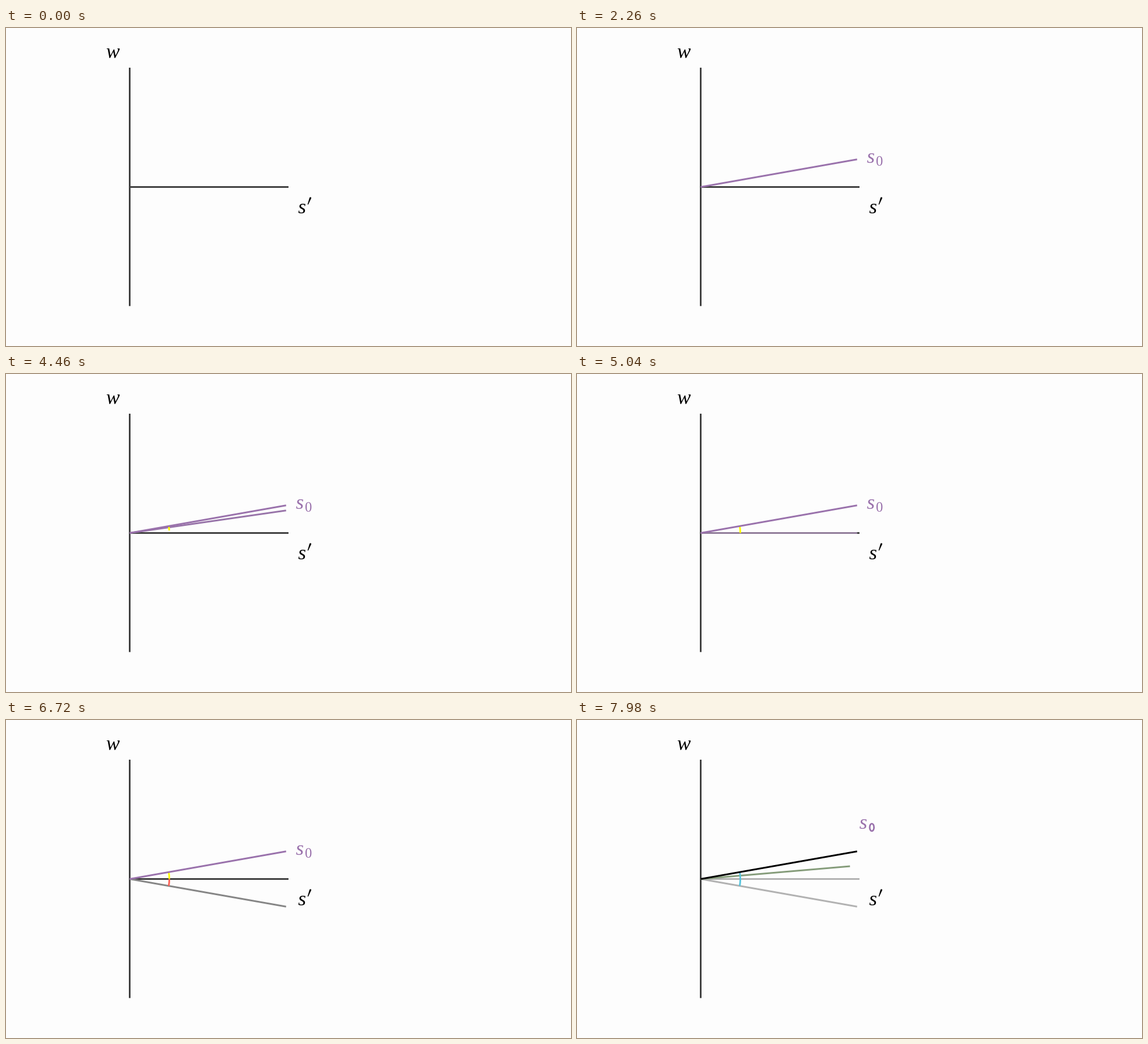
Write an HTML page with a canvas that moves like this. It is 998 px wide and 561 px high and loops after 8000 ms.

```html
<!DOCTYPE html>
<html lang="en">
<head>
<meta charset="utf-8">
<title>Reflected rays</title>
<style>
  html, body { margin: 0; width: 100%; height: 100%; overflow: hidden; background: #fdfdfd; }
  canvas { display: block; }
</style>
</head>
<body>
<canvas id="stage" width="998" height="561"></canvas>
<script>
const ctx = document.getElementById("stage").getContext("2d");
const LOOP = 8000;
const ORIGIN = { x: 218.5, y: 280.5 };
const RAY = 280.5;
const ARC = 70;
const SERIF = '"Liberation Serif", "Noto Serif", serif';
const LETTER = "italic 36px " + SERIF;
const DIGIT = "25px " + SERIF;

const BLACK = [0, 0, 0];
const PURPLE = [154, 114, 172];
const YELLOW = [255, 255, 0];
const ORANGE = [226, 128, 50];
const RED = [252, 98, 85];
const CYAN = [88, 196, 221];
const GREEN = [131, 193, 103];
const AXIS = [64, 64, 64];
const RAY_GREY = [134, 134, 134];
const FADED = [178, 178, 178];

const clamp = v => Math.min(1, Math.max(0, v));
const mix = (a, b, p) => a + (b - a) * p;
const mixColor = (a, b, p) => a.map((v, i) => mix(v, b[i], p));
const rgb = c => `rgb(${c.map(Math.round).join()})`;
const part = (t, start, length) => clamp((t - start) / length);

// Sigmoid easing, rescaled to run exactly from 0 to 1.
const sigmoid = v => 1 / (1 + Math.exp(-v));
const smooth = u => clamp((sigmoid(10 * u - 5) - sigmoid(-5)) / (1 - 2 * sigmoid(-5)));

const tip = degrees => {
  const a = degrees * Math.PI / 180;
  return { x: ORIGIN.x + RAY * Math.cos(a), y: ORIGIN.y - RAY * Math.sin(a) };
};
const mixPoint = (a, b, p) => ({ x: mix(a.x, b.x, p), y: mix(a.y, b.y, p) });

function line(from, to, color) {
  ctx.strokeStyle = rgb(color);
  ctx.lineWidth = 3;
  ctx.beginPath();
  ctx.moveTo(from.x, from.y);
  ctx.lineTo(to.x, to.y);
  ctx.stroke();
}

function arc(start, end, p, color, alpha = 1) {
  if (p <= 0 || alpha <= 0) return;
  const a = -start * Math.PI / 180;
  const b = -mix(start, end, p) * Math.PI / 180;
  ctx.globalAlpha = alpha;
  ctx.strokeStyle = rgb(color);
  ctx.lineWidth = 3;
  ctx.beginPath();
  ctx.arc(ORIGIN.x, ORIGIN.y, ARC, a, b, end > start);
  ctx.stroke();
  ctx.globalAlpha = 1;
}

function glyph(text, font, x, y, color) {
  ctx.font = font;
  ctx.fillStyle = rgb(color);
  ctx.fillText(text, x, y);
}

// Trace the outline in the first half, then fill it in.
function writeGlyph(text, font, x, y, color, u, outline) {
  if (u <= 0) return;
  const traced = smooth(clamp(u * 2));
  const filled = smooth(clamp(u * 2 - 1));
  if (filled < 1) {
    ctx.font = font;
    ctx.strokeStyle = rgb(color);
    ctx.lineWidth = 1.3 * (1 - filled);
    if (traced < 0.99) ctx.setLineDash([outline * traced, 1000]);
    ctx.strokeText(text, x, y);
    ctx.setLineDash([]);
  }
  ctx.globalAlpha = filled;
  glyph(text, font, x, y, color);
  ctx.globalAlpha = 1;
}

function axisLabels() {
  glyph("w", LETTER, 177, 53, BLACK);
  glyph("s", LETTER, 516, 327, BLACK);
  ctx.beginPath();
  ctx.moveTo(532.6, 311.2);
  ctx.lineTo(536.2, 299.2);
  ctx.quadraticCurveTo(538.3, 297, 539.4, 299.8);
  ctx.lineTo(533.9, 311.6);
  ctx.fill();
}

function rayLabel(written, moved) {
  const x = 512 - 35 * moved;
  const y = 238 - 121 * moved;
  const u = written * 1.2;
  writeGlyph("s", LETTER, x, y, PURPLE, clamp(u), 80);
  if (moved < 0.02) {
    writeGlyph("0", DIGIT, x + 16, y + 5, PURPLE, clamp(u - 0.2), 50);
    return;
  }
  ctx.strokeStyle = rgb(PURPLE);
  ctx.lineWidth = 1.7 + 3 * moved;
  ctx.beginPath();
  ctx.ellipse(x + 22, y - 3, 5.3 - 4 * moved, 7.6 - 3 * moved, 0, 0, 2 * Math.PI);
  ctx.stroke();
}

function draw(t) {
  const drawn = part(t, 660, 1500);
  const firstTurn = part(t, 3740, 2600);
  const dim = smooth(part(t, 6850, 550));
  const secondTurn = part(t, 7400, 1290);
  const firstHalf = u => smooth(clamp(u * 2));
  const secondHalf = u => smooth(clamp(u * 2 - 1));

  ctx.fillStyle = "#fdfdfd";
  ctx.fillRect(0, 0, 998, 561);

  line({ x: 218.5, y: 70 }, { x: 218.5, y: 490.5 }, AXIS);
  line(ORIGIN, { x: 499, y: ORIGIN.y }, mixColor(AXIS, FADED, dim));

  if (firstTurn > 0) {
    const p = smooth(firstTurn);
    const color = mixColor(PURPLE, RAY_GREY, p);
    line(ORIGIN, mixPoint(tip(10), tip(-10), p), mixColor(color, FADED, dim));
  }

  const red = secondHalf(firstTurn);
  arc(10, 0, firstHalf(firstTurn), YELLOW, 1 - dim);
  arc(0, -10, red, mixColor(ORANGE, RED, clamp(red * 2 - 0.8)), 1 - dim);

  const moved = smooth(secondTurn);
  if (secondTurn > 0) {
    line(ORIGIN, mixPoint(tip(-10), tip(30), moved), mixColor(RAY_GREY, GREEN, moved));
    arc(-10, 10, firstHalf(secondTurn), CYAN);
  }

  if (drawn > 0) {
    line(ORIGIN, mixPoint(ORIGIN, tip(10), smooth(drawn)), mixColor(PURPLE, BLACK, dim));
  }

  axisLabels();
  rayLabel(drawn, moved);
}

const began = performance.now();
function tick() {
  draw((performance.now() - began) % LOOP);
  requestAnimationFrame(tick);
}
tick();
</script>
</body>
</html>
```
